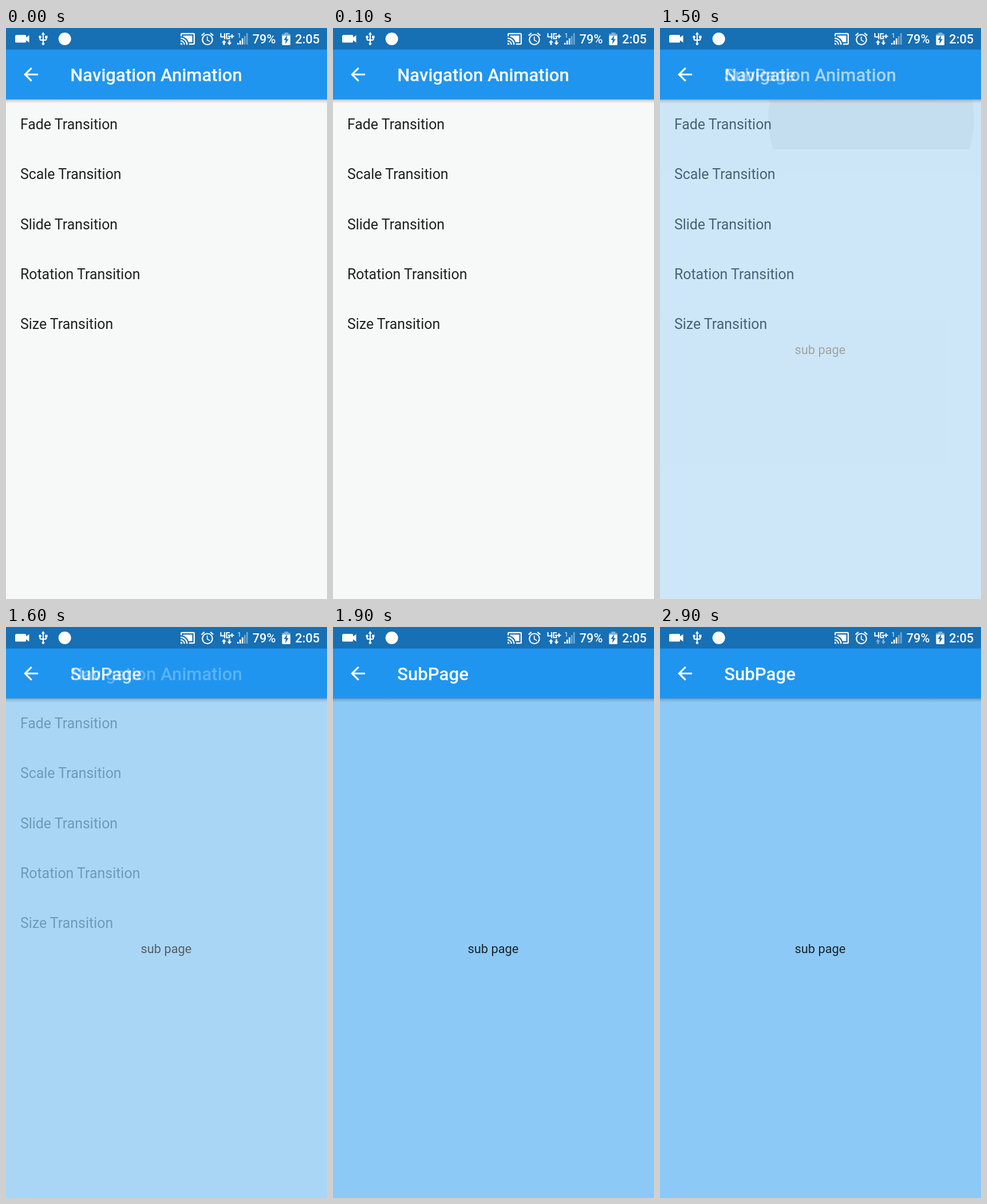
An HTML page for the animation above (3.4 s loop, 561 by 998 pixels).

```html
<!DOCTYPE html>
<html lang="en">
<head>
<meta charset="utf-8">
<title>Navigation Animation</title>
<style>
  html, body { margin: 0; width: 100%; height: 100%; overflow: hidden; }
  svg { display: block; width: 561px; height: 998px; font-family: Roboto, sans-serif; }
  .title { font-size: 31.17px; font-weight: 500; fill: #fff; }
  .item { font-size: 24.93px; fill: #1f2120; }
  .body { font-size: 21.8px; fill: #1b2429; text-anchor: middle; }
  .status { font-size: 21.8px; font-weight: 500; }
</style>
</head>
<body>
<svg viewBox="0 0 561 998">
  <defs>
    <linearGradient id="shade" x2="0" y2="1">
      <stop stop-opacity=".3"/>
      <stop offset=".4" stop-opacity=".12"/>
      <stop offset="1" stop-opacity="0"/>
    </linearGradient>
    <clipPath id="row"><rect y="125" width="561" height="87"/></clipPath>
    <g id="bar">
      <rect y="124" width="561" height="8" fill="url(#shade)"/>
      <rect width="561" height="124.7" fill="#1f95f0"/>
      <path transform="translate(24.9 62.6) scale(1.558)" fill="#fff"
        d="M20 11H7.83l5.59-5.59L12 4l-8 8 8 8 1.41-1.41L7.83 13H20z"/>
    </g>
  </defs>

  <g id="list">
    <rect width="561" height="998" fill="#f7f9f8"/>
    <circle id="ripple" cx="369" cy="158" r="180" fill-opacity=".05" clip-path="url(#row)"/>
    <use href="#bar"/>
    <text class="title" x="112.2" y="93">Navigation Animation</text>
  </g>

  <g id="sub">
    <rect width="561" height="998" fill="#8dc9f6"/>
    <use href="#bar"/>
    <text class="title" x="112.2" y="93">SubPage</text>
    <text class="body" x="280" y="569.5">sub page</text>
  </g>

  <!-- system status bar -->
  <rect width="561" height="37.6" fill="#176fb4"/>
  <g fill="#fff">
    <path d="M17.500 12h16q1.500 0 1.500 1.500v3l5.500-4v13l-5.500-4v2.500q0 1.500-1.500 1.500h-16q-1.500 0-1.500-1.500v-10q0-1.500 1.500-1.500z"/>
    <path transform="translate(52 6) scale(1.08)"
      d="M15 7v4h1v2h-3V5h2l-3-4-3 4h2v8H8v-2.070c.7-.37 1.200-1.080 1.200-1.930a2.200 2.200 0 1 0-3.200 1.930V13a2 2 0 0 0 2 2h3v3.050a2.200 2.200 0 1 0 2 0V15h3a2 2 0 0 0 2-2v-2h1V7z"/>
    <circle cx="102.700" cy="19" r="11"/>
    <path transform="translate(303.900 5.400) scale(1.136)"
      d="M1 18v3h3a3 3 0 0 0-3-3zm0-4v2a5 5 0 0 1 5 5h2a7 7 0 0 0-7-7zM19 7H5v1.630A13 13 0 0 1 13.370 17H19zM1 10v2a9 9 0 0 1 9 9h2A11 11 0 0 0 1 10zM21 3H3a2 2 0 0 0-2 2v3h2V5h18v14h-7v2h7a2 2 0 0 0 2-2V5a2 2 0 0 0-2-2z"/>
    <path transform="translate(338.800 6) scale(1.1)"
      d="M22 5.720l-4.600-3.860-1.290 1.530 4.600 3.860zM7.880 3.390L6.600 1.860 2 5.710l1.290 1.530zM12.500 8H11v6l4.750 2.850.75-1.230-4-2.370zM12 4a9 9 0 1 0 0 18 9 9 0 0 0 0-18zm0 16a7 7 0 1 1 0-14 7 7 0 0 1 0 14z"/>
    <path fill="none" stroke="#fff" stroke-width="2"
      d="M375.500 9v6.500h8M382 9v10.500M391 10h-5.500v8.500h5v-4h-2.500M391.500 14.500h7M395 11v7"/>
    <path id="data" d="M381 21l4 4.500h-2.500v4h-3v-4h-2.500zM390.500 30l4-4.500h-2.500v-4h-3v4h-2.500z"/>
    <text x="404.500" y="17" font-size="11.500">1</text>
    <g id="signal"></g>
    <path opacity=".45" d="M486.500 8h7v2.500h3.500v4h-14.500v-4h4z"/>
    <path d="M482.500 13.500h14.500v15q0 1.500-1.500 1.500h-11.500q-1.500 0-1.500-1.500z"/>
    <path fill="#176fb4" d="M491.500 12.500l-6 8.500h3.500l-1 7 6-8.500h-3.500z"/>
    <text class="status" x="430.700" y="27.300">79%</text>
    <text class="status" x="505.300" y="27.300">2:05</text>
  </g>
</svg>
<script>
  const LOOP = 3400, STEP = 100, FADE_START = 1500;
  const FADE = [0.39, 0.72, 0.985];
  const $ = id => document.getElementById(id);

  function add(parent, tag, attrs, text = '') {
    const el = document.createElementNS('http://www.w3.org/2000/svg', tag);
    for (const key in attrs) el.setAttribute(key, attrs[key]);
    el.textContent = text;
    parent.append(el);
  }

  ['Fade', 'Scale', 'Slide', 'Rotation', 'Size'].forEach((name, i) =>
    add($('list'), 'text', { class: 'item', x: 24.9, y: 177 + 87.3 * i }, name + ' Transition'));

  [3, 7, 11, 15, 20].forEach((height, i) =>
    add($('signal'), 'rect', { x: 404 + 4 * i, y: 29 - height, width: 2.6, height, opacity: i < 3 ? 1 : 0.4 }));

  function draw(now) {
    const t = now % LOOP;
    const step = Math.floor((t - FADE_START) / STEP);
    $('sub').style.opacity = step < 0 ? 0 : FADE[step] ?? 1;
    $('ripple').style.opacity = step === 0 ? 1 : 0;
    $('data').style.opacity = t < 2900 ? 1 : 0.45;
    requestAnimationFrame(draw);
  }
  draw(performance.now());
</script>
</body>
</html>
```
